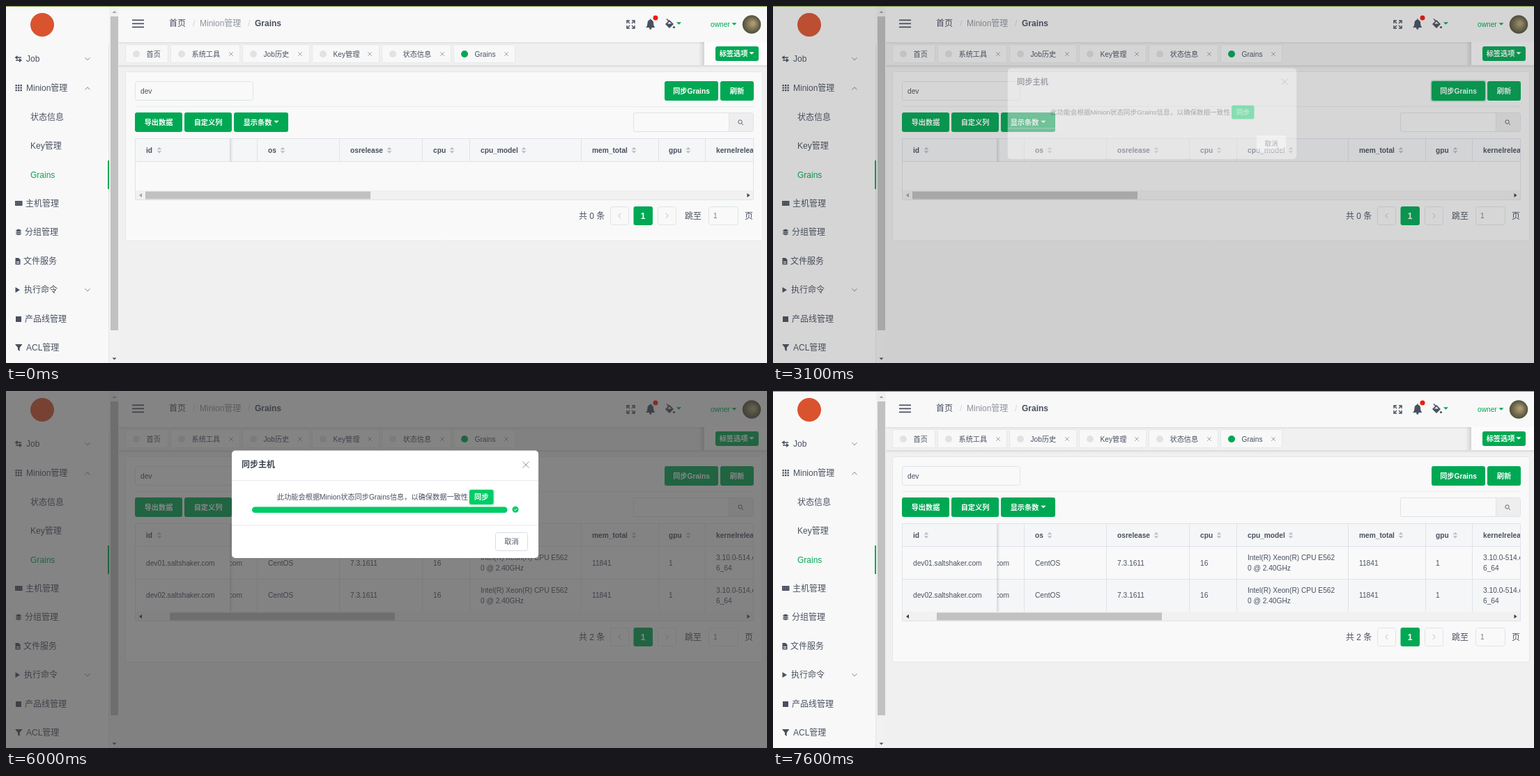
Write an HTML page with a canvas that moves like this. It is 1092x513 px and loops after 8000 ms.

```html
<!DOCTYPE html>
<html lang="zh-CN">
<head>
<meta charset="utf-8">
<title>Grains</title>
<style>
html, body { margin: 0; width: 100%; height: 100%; overflow: hidden; background: #f0f0f0; }
canvas { display: block; }
</style>
</head>
<body>
<canvas id="stage" width="1092" height="513"></canvas>
<script>
const ctx = document.getElementById('stage').getContext('2d');
const FONT = '"Liberation Sans", "Noto Sans CJK SC", "Noto Sans CJK", sans-serif';
const GREEN = '#00a854', BRIGHT = '#00cc66', INK = '#495060', PALE = '#f8f8f8', LINE = '#dfe3e8';
const SMALL = 10.2, NORMAL = 12, LOOP = 8000;

function text(s, x, y, { size = SMALL, color = INK, bold = false, align = 'left' } = {}) {
  ctx.font = `${bold ? 'bold ' : ''}${size}px ${FONT}`;
  ctx.fillStyle = color;
  ctx.textAlign = align;
  ctx.fillText(s, x, y + size * 0.36);
}

function rect(x, y, w, h, color) {
  ctx.fillStyle = color;
  ctx.fillRect(x, y, w, h);
}

function box(x, y, w, h, { fill, border, r = 3 } = {}) {
  ctx.beginPath();
  if (border) ctx.roundRect(x + 0.5, y + 0.5, w - 1, h - 1, r);
  else ctx.roundRect(x, y, w, h, r);
  if (fill) { ctx.fillStyle = fill; ctx.fill(); }
  if (border) { ctx.strokeStyle = border; ctx.lineWidth = 1; ctx.stroke(); }
}

function circle(x, y, r, color) {
  ctx.beginPath();
  ctx.arc(x, y, r, 0, Math.PI * 2);
  ctx.fillStyle = color;
  ctx.fill();
}

function poly(points, color) {
  ctx.beginPath();
  points.forEach(([x, y]) => ctx.lineTo(x, y));
  ctx.closePath();
  ctx.fillStyle = color;
  ctx.fill();
}

function stroke(points, color, width = 1) {
  ctx.beginPath();
  points.forEach(([x, y], i) => i ? ctx.lineTo(x, y) : ctx.moveTo(x, y));
  ctx.strokeStyle = color;
  ctx.lineWidth = width;
  ctx.stroke();
}

function fade(x0, y0, x1, y1, w, h, from, to) {
  const g = ctx.createLinearGradient(x0, y0, x1, y1);
  g.addColorStop(0, from);
  g.addColorStop(1, to);
  rect(Math.min(x0, x1), Math.min(y0, y1), w, h, g);
}

// Triangles: dir 1 points down, -1 points up
const caret = (x, y, w, color, dir = 1) =>
  poly([[x - w, y - dir * w / 2], [x + w, y - dir * w / 2], [x, y + dir * w / 2]], color);
const sideCaret = (x, y, dir, color) => poly([[x - dir * 2, y - 3], [x - dir * 2, y + 3], [x + dir * 2, y]], color);
const chevron = (x, y, dir) => stroke([[x - 3.5, y - dir * 1.8], [x, y + dir * 1.8], [x + 3.5, y - dir * 1.8]], '#7b8290');
const sideChevron = (x, y, dir) => stroke([[x - dir * 1.8, y - 3.5], [x + dir * 1.8, y], [x - dir * 1.8, y + 3.5]], '#bbbec4');

function cross(x, y, r, color) {
  stroke([[x - r, y - r], [x + r, y + r]], color);
  stroke([[x + r, y - r], [x - r, y + r]], color);
}

function button(label, x, y, w, h, { fill = GREEN, ring, drop = false } = {}) {
  if (ring) box(x - 1.5, y - 1.5, w + 3, h + 3, { fill: ring, r: 4 });
  box(x, y, w, h, { fill });
  text(label, x + w / 2 - (drop ? 5 : 0), y + h / 2, { color: '#fff', bold: true, align: 'center' });
  if (drop) caret(x + w - 17 + (w < 70 ? 7 : 0), y + h / 2 - 0.5, 3.6, '#fff');
}

const sideIcons = [
  y => {
    stroke([[14, y - 2], [22, y - 2]], INK, 1.5);
    stroke([[14, y + 2], [22, y + 2]], INK, 1.5);
    sideCaret(14.5, y - 2, -1, INK);
    sideCaret(21, y + 2, 1, INK);
  },
  y => { for (let i = 0; i < 9; i++) rect(13.5 + i % 3 * 3.5, y - 5 + Math.floor(i / 3) * 3.5, 2.3, 2.3, INK); },
  y => {
    rect(13, y - 4, 10.5, 7, INK);
    for (let i = 0; i < 6; i++) rect(14.5 + i % 3 * 3, y - 2.5 + Math.floor(i / 3) * 2.5, 1, 1, '#aaa');
  },
  y => {
    for (const dy of [2.5, 0, -2.5]) {
      poly([[13, y + dy], [18, y + dy - 2.8], [23, y + dy], [18, y + dy + 2.8]], PALE);
      poly([[13.5, y + dy], [18, y + dy - 2.1], [22.5, y + dy], [18, y + dy + 2.1]], INK);
    }
  },
  y => {
    poly([[13.5, y - 5], [18, y - 5], [20.5, y - 2.5], [20.5, y + 4.5], [13.5, y + 4.5]], INK);
    rect(15, y, 4, 1, PALE);
    rect(15, y + 2, 4, 1, PALE);
  },
  y => poly([[13.5, y - 4], [20, y], [13.5, y + 4]], INK),
  y => rect(14, y - 4, 8, 8, INK),
  y => poly([[13, y - 5], [23.5, y - 5], [19.7, y], [19.7, y + 5], [17, y + 3], [17, y]], INK)
];

function sidebar() {
  rect(0, 0, 148, 513, PALE);
  circle(52, 27, 17, '#d9532f');
  const items = [['Job', 29, 76], ['Minion管理', 29, 118], ['主机管理', 28, 284], ['分组管理', 27, 325],
    ['文件服务', 25, 367], ['执行命令', 26, 408], ['产品线管理', 27, 450], ['ACL管理', 29, 491]];
  items.forEach(([label, x, y], i) => {
    sideIcons[i](y);
    text(label, x, y, { size: NORMAL });
  });
  ['状态信息', 'Key管理', 'Grains'].forEach((label, i) =>
    text(label, 35, 159.5 + i * 41.5, { size: NORMAL, color: i === 2 ? GREEN : INK }));
  chevron(117, 76, 1);
  chevron(117, 118.5, -1);
  chevron(117, 408, 1);
  rect(147, 56, 1, 457, '#e3e5e8');
  rect(146, 222, 2, 41, GREEN);
  rect(148, 0, 14, 513, '#f1f1f1');
  rect(150, 15, 11, 451, '#c1c1c1');
  caret(155.5, 8.5, 3, '#a3a3a3', -1);
  caret(155.5, 507, 3, '#505050');
}

function header() {
  rect(162, 0, 930, 52, PALE);
  for (const y of [19.5, 24.5, 29.5]) rect(181, y, 17, 1.7, INK);
  text('首页', 234, 25, { size: NORMAL });
  text('/', 268, 25, { size: NORMAL, color: '#d2d5da' });
  text('Minion管理', 278, 25, { size: NORMAL, color: '#8e939c' });
  text('/', 347, 25, { size: NORMAL, color: '#d2d5da' });
  text('Grains', 357, 25, { size: NORMAL, bold: true });

  for (const sx of [-1, 1]) for (const sy of [-1, 1]) {
    const cx = 896.5 + sx * 5.5, cy = 26.5 + sy * 5.5;
    stroke([[cx - sx * 4, cy], [cx, cy], [cx, cy - sy * 4]], INK, 1.4);
    stroke([[cx, cy], [cx - sx * 4, cy - sy * 4]], INK, 1.4);
  }
  ctx.beginPath();
  ctx.moveTo(918, 31);
  ctx.quadraticCurveTo(920.5, 29, 920.5, 25);
  ctx.arc(924.8, 24, 4.3, Math.PI, 0);
  ctx.quadraticCurveTo(929, 29, 931.5, 31);
  ctx.fillStyle = INK;
  ctx.fill();
  rect(924, 18.5, 1.6, 3, INK);
  circle(924.8, 32, 1.7, INK);
  circle(932, 17, 3.5, '#f5160c');
  poly([[946, 26], [952, 20], [958, 26], [952, 32]], INK);
  stroke([[948, 18.5], [953, 24]], INK, 1.5);
  poly([[949, 25.5], [952, 22.5], [955, 25.5]], PALE);
  circle(958.5, 30.5, 1.6, INK);
  caret(965.5, 25, 3.5, GREEN);
  text('owner', 1011, 26.5, { color: GREEN });
  caret(1045, 26, 3.5, GREEN);
  const photo = ctx.createRadialGradient(1072, 25, 2, 1070, 26.5, 13.5);
  photo.addColorStop(0, '#a79a74');
  photo.addColorStop(0.55, '#766d50');
  photo.addColorStop(1, '#4d4e3c');
  circle(1070, 26.5, 13.2, photo);
}

function tags() {
  rect(162, 52, 930, 461, '#f0f0f0');
  fade(162, 52, 162, 55, 930, 3, '#dedede', '#f0f0f0');
  const list = [['首页', 171, 233], ['系统工具', 236, 336, 323], ['Job历史', 339, 436, 422],
    ['Key管理', 439, 536, 522], ['状态信息', 539, 639, 626], ['Grains', 642, 731, 718]];
  list.forEach(([label, x0, x1, closeX], i) => {
    box(x0, 55, x1 - x0, 27, { fill: PALE, border: '#e6e8eb', r: 2 });
    circle(x0 + 16, 69, 5, i === 5 ? GREEN : '#e2e2e2');
    text(label, x0 + 30.5, 69);
    if (closeX) cross(closeX, 69, 2.8, '#a0a3a8');
  });
  fade(994, 52, 1002, 52, 8, 34, 'rgba(0,0,0,0)', 'rgba(0,0,0,.12)');
  rect(1002, 52, 90, 34, '#fcfcfc');
  button('标签选项', 1018, 58, 62, 21, { drop: true });
  fade(162, 85, 162, 89, 930, 4, '#d9d9d9', '#f0f0f0');
}

const columns = [['id', 201, 220], ['os', 376, 397], ['osrelease', 494, 550], ['cpu', 613, 640],
  ['cpu_model', 681, 743], ['mem_total', 841, 901], ['gpu', 951, 979], ['kernelrelease', 1019]];

function tableRow(id, y) {
  text(id, 201, y);
  ctx.save();
  ctx.beginPath();
  ctx.rect(322, 190, 750, 141);
  ctx.clip();
  text('com', 339, y, { align: 'right' });
  text('CentOS', 376, y);
  text('7.3.1611', 494, y);
  text('16', 613, y);
  text('Intel(R) Xeon(R) CPU E562', 681, y - 7.5);
  text('0 @ 2.40GHz', 681, y + 7.5);
  text('11841', 841, y);
  text('1', 951, y);
  text('3.10.0-514.el7.x8', 1019, y - 7.5);
  text('6_64', 1019, y + 7.5);
  ctx.restore();
}

function table(loaded) {
  const bottom = loaded ? 331 : 279, bar = bottom - 14;
  rect(185, 190, 887, bottom - 190, '#f9f9f9');
  rect(185, 190, 887, 34, '#f5f6f7');
  if (loaded) rect(185, 270, 887, 47, '#f5f6f8');
  ctx.save();
  ctx.beginPath();
  ctx.rect(185, 190, 887, 141);
  ctx.clip();
  columns.forEach(([label, x, sortX]) => {
    text(label, x, 207.5, { bold: true });
    if (!sortX) return;
    caret(sortX, 204.5, 3.3, '#bbbec4', -1);
    caret(sortX, 210, 3.3, '#bbbec4');
  });
  ctx.restore();
  for (const x of [360, 478, 597, 665, 825, 936, 1003]) rect(x, 190, 1, (loaded ? bar : 224) - 190, LINE);
  rect(185, 223, 887, 1, LINE);
  if (loaded) {
    rect(185, 270, 887, 1, LINE);
    tableRow('dev01.saltshaker.com', 247);
    tableRow('dev02.saltshaker.com', 293.5);
  }
  const fixedEnd = loaded ? bar : 224;
  rect(321, 190, 1, fixedEnd - 190, '#d5d9de');
  fade(322, 190, 326, 190, 4, fixedEnd - 190, 'rgba(0,0,0,.09)', 'rgba(0,0,0,0)');
  rect(185, bar, 887, 14, '#f1f1f1');
  rect(loaded ? 235 : 200, bar + 1.5, 323, 11, '#c1c1c1');
  sideCaret(193, bar + 7, -1, loaded ? '#404040' : '#a3a3a3');
  sideCaret(1065.5, bar + 7, 1, '#404040');
  box(185, 190, 888, bottom - 190, { border: LINE, r: 0 });
}

function pager(loaded) {
  const y = loaded ? 353.5 : 301.5, top = y - 13.5;
  text(`共 ${loaded ? 2 : 0} 条`, 822, y, { size: NORMAL });
  box(867, top, 27, 27, { border: LINE });
  sideChevron(880.5, y, -1);
  box(900.5, top, 27.5, 27, { fill: GREEN });
  text('1', 914, y, { size: NORMAL, color: '#fff', bold: true, align: 'center' });
  box(935, top, 27, 27, { border: LINE });
  sideChevron(948.5, y, 1);
  text('跳至', 974, y, { size: NORMAL });
  box(1008, top, 43, 27, { border: LINE });
  text('1', 1015, y, { color: '#777d88' });
  text('页', 1060, y, { size: NORMAL });
}

function page(t, loaded) {
  sidebar();
  header();
  tags();
  box(171, 94, 915, loaded ? 296 : 244, { fill: '#f9f9f9', border: '#e3e8ec' });
  box(185, 108, 170, 28, { border: LINE });
  text('dev', 193, 122);
  const hovered = t >= 2500 && t < 2900;
  const focused = t >= 2900 && t < 3800;
  button('同步Grains', 945, 108, 77, 28, { fill: hovered ? '#2fb975' : GREEN, ring: focused && 'rgba(0,168,84,.3)' });
  button('刷新', 1025, 108, 48, 28);
  rect(185, 144, 888, 1, '#e9eaec');
  button('导出数据', 185, 153, 68, 28);
  button('自定义列', 256, 153, 68, 28);
  button('显示条数', 327, 153, 78, 28, { drop: true });
  box(900, 153, 173, 28, { fill: '#eeeeee', border: LINE });
  box(900, 153, 138, 28, { fill: '#f9f9f9', border: LINE, r: 2 });
  ctx.beginPath();
  ctx.arc(1053.5, 166.5, 2.7, 0, Math.PI * 2);
  ctx.strokeStyle = INK;
  ctx.lineWidth = 0.9;
  ctx.stroke();
  stroke([[1055.5, 168.5], [1058, 171]], INK, 0.9);
  table(loaded);
  pager(loaded);
}

function progress(done) {
  box(353, 166.5, 366.5, 8.5, { fill: '#f3f3f3', r: 4.25 });
  if (done > 0) box(353, 166.5, 366.5 * done, 8.5, { fill: BRIGHT, r: 4.25 });
  if (done === 1) {
    circle(731, 170.3, 4.5, BRIGHT);
    stroke([[729, 170.4], [730.5, 171.8], [733.2, 169]], '#fff', 1);
  } else {
    text('0%', 725, 170.5);
  }
}

function modal(t, opacity) {
  const tall = t >= 4200, grow = tall ? 16 : 0, height = 138.5 + grow;
  const scale = 0.9 + 0.1 * opacity, cx = 544, cy = 85.5 + height / 2;
  ctx.save();
  ctx.globalAlpha = opacity;
  ctx.translate(cx, cy);
  ctx.scale(scale, scale);
  ctx.translate(-cx, -cy);
  box(324, 85.5, 440, height, { fill: '#fff', r: 5 });
  text('同步主机', 338, 106, { size: NORMAL, bold: true, color: '#3b4250' });
  cross(746, 106, 4.5, t >= 6400 ? '#666' : '#999');
  rect(324, 128, 440, 1, '#e9eaec');
  text('此功能会根据Minion状态同步Grains信息，以确保数据一致性', 389, 152);
  const hovered = t >= 3800 && t < 6000;
  const ring = t >= 4000 && t < 7000 && 'rgba(0,204,102,.22)';
  button('同步', 665, 142, 34.5, 21, { fill: hovered ? '#33d685' : BRIGHT, ring });
  if (tall) progress(t < 5000 ? 0 : t < 5100 ? 0.35 : t < 5200 ? 0.85 : 1);
  rect(324, 176.5 + grow, 440, 1, '#e9eaec');
  box(702, 187 + grow, 47, 27, { fill: '#fff', border: '#d7dde4' });
  text('取消', 725.5, 200.5 + grow, { align: 'center' });
  ctx.restore();
}

// [start time, backdrop strength, dialog opacity], each held until the next
const dialogSteps = [[0, 0, 0], [3100, 0.3, 0.42], [3200, 0.78, 0.87], [3300, 1, 1],
  [7300, 0.93, 0.88], [7400, 0.62, 0.42], [7500, 0.22, 0.07], [7600, 0, 0]];

function draw(t) {
  page(t, t >= 5000);
  const [, shade, opacity] = dialogSteps.findLast(([start]) => t >= start);
  if (shade) {
    rect(0, 1, 1092, 512, `rgba(55,55,55,${0.6 * shade})`);
    modal(t, opacity);
  }
  rect(0, 0, 1092, 1, '#7c9a45');
}

const begin = performance.now();
function tick() {
  draw((performance.now() - begin) % LOOP);
  requestAnimationFrame(tick);
}
tick();
</script>
</body>
</html>
```
